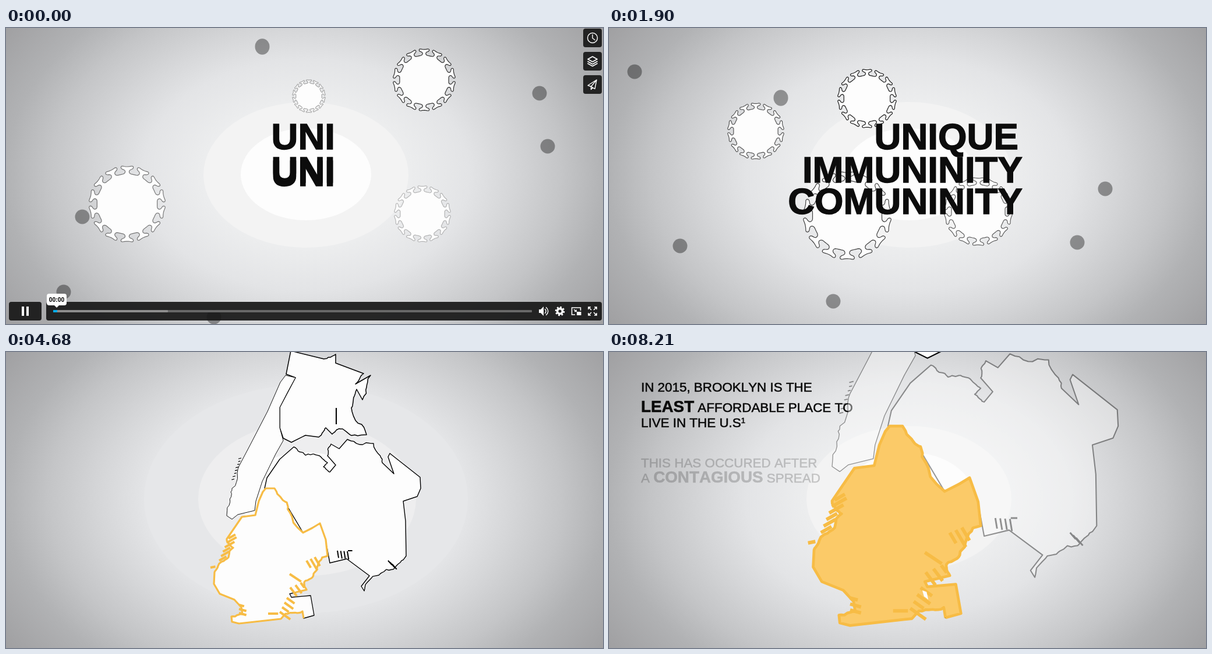
An HTML page that plays this animation: 1025x508 px, repeating every 8230 ms.

```html
<!DOCTYPE html>
<html lang="en">
<head>
<meta charset="utf-8">
<title>Unique immunity</title>
<style>
  html, body { margin: 0; width: 100%; height: 100%; overflow: hidden; background: #d4d5d6; }
  svg { display: block; width: 100%; height: 100%; font-family: "Liberation Sans", Arial, sans-serif; font-kerning: none; }
  .word { font-size: 63.6px; font-weight: bold; fill: #0c0c0c; stroke: #0c0c0c; stroke-width: 1.4; }
  .note { font-size: 22.4px; fill: #0a0a0a; stroke: #0a0a0a; stroke-width: .55; }
  .note .big { font-size: 27.8px; font-weight: bold; }
  .panel { fill: #171717; fill-opacity: .92; }
  .line { fill: none; stroke: #fff; stroke-width: 1.4; stroke-linejoin: round; stroke-linecap: round; }
</style>
</head>
<body>
<svg viewBox="0 0 1025 508">
  <defs>
    <radialGradient id="bg" gradientUnits="userSpaceOnUse" cx="0" cy="0" r="640"
      gradientTransform="translate(515 252) scale(1 .71)">
      <stop offset="0" stop-color="#f1f1f2"/>
      <stop offset=".28" stop-color="#ecedee"/>
      <stop offset=".4375" stop-color="#e3e4e6"/>
      <stop offset=".555" stop-color="#d5d6d8"/>
      <stop offset=".6875" stop-color="#c4c5c7"/>
      <stop offset=".805" stop-color="#b1b2b4"/>
      <stop offset=".977" stop-color="#a0a0a2"/>
    </radialGradient>
  </defs>
  <rect width="1025" height="508" fill="url(#bg)"/>
  <ellipse cx="515" cy="252" rx="176" ry="125" fill="#f3f3f3"/>
  <g id="rings">
    <ellipse cx="515" cy="252" rx="278" ry="196" fill="#e6e7e9"/>
    <ellipse cx="517" cy="252" rx="187" ry="132" fill="#eeeeef"/>
  </g>
  <ellipse cx="515" cy="251" rx="112" ry="79" fill="#fdfdfd"/>
  <g id="dots" fill-opacity=".37"></g>
  <g id="note1" class="note">
    <text x="55" y="68">IN 2015, BROOKLYN IS THE</text>
    <text x="55" y="103"><tspan class="big">LEAST</tspan> AFFORDABLE PLACE TO</text>
    <text x="55" y="128.5">LIVE IN THE U.S<tspan font-size="13" dy="-7">1</tspan></text>
  </g>
  <g id="note2" class="note">
    <text x="55" y="197.5">THIS HAS OCCURED AFTER</text>
    <text x="55" y="224">A <tspan class="big">CONTAGIOUS</tspan> SPREAD</text>
  </g>
  <g id="map" stroke-linejoin="round"></g>
  <g id="words" class="word"></g>
  <g id="player">
    <g class="panel">
      <rect x="991" y="1" width="32" height="32" rx="4"/>
      <rect x="991" y="41" width="32" height="32" rx="4"/>
      <rect x="991" y="81" width="32" height="32" rx="4"/>
      <rect x="5" y="470" width="56" height="32" rx="4"/>
      <rect x="69" y="470" width="954" height="32" rx="4"/>
    </g>
    <g class="line">
      <circle cx="1007" cy="17" r="8.5"/>
      <path d="M1007 11.5V17.5L1011 20.5"/>
      <path d="M1007 49l8 4.500-8 4.500-8-4.500zM999 57.500l8 4.500 8-4.500M999 61l8 4.500 8-4.500" stroke-width="1.700"/>
      <path d="M1014 89l-15 9.500 5.500 2 6.500 4zl-9.500 11.500v5l3-3.500"/>
    </g>
    <path d="M27 478h4v16h-4zM35 478h4v16h-4z" fill="#fff"/>
    <rect x="81" y="484" width="822" height="4" rx="1" fill="#686868"/>
    <rect x="81" y="484" width="197" height="4" rx="1" fill="#8e8e8e"/>
    <rect x="81" y="484" width="7" height="4" rx="1" fill="#00adef"/>
    <rect x="70" y="456" width="34" height="20" rx="4" fill="#fff"/>
    <path d="M83 476h8l-4 4z" fill="#fff"/>
    <text x="87" y="470" font-size="10.3" font-weight="bold" text-anchor="middle">00:00</text>
    <path d="M915 483h3l5-5v16l-5-5h-3z" fill="#fff"/>
    <path class="line" d="M925.5 482.5q3 3.500 0 7M927.500 479.500q6.500 6.500 0 13" stroke-width="1.800"/>
    <g fill="none" stroke="#fff" stroke-width="1.6">
      <circle cx="951" cy="486" r="4.4" stroke-width="3.6"/>
      <circle cx="951" cy="486" r="7" stroke-width="2.6" stroke-dasharray="2.75"/>
      <path d="M977 492h-5.500v-12h15v5M975 483l4 3.500m0-3v3h-3"/>
      <path id="corner" d="M1004 479h-4v4m0-4l5 5"/>
      <use href="#corner" transform="rotate(90 1007 486)"/>
      <use href="#corner" transform="rotate(180 1007 486)"/>
      <use href="#corner" transform="rotate(270 1007 486)"/>
    </g>
    <rect x="980" y="487" width="7.5" height="6" fill="#fff"/>
  </g>
</svg>
<script>
const LOOP = 8230, STEP = 146.4, SAMPLES = 420, SPIKES = 14;
const $ = id => document.getElementById(id);
const clamp = v => Math.max(0, Math.min(1, v));
const ramp = (k, a, b) => clamp((k - a) / (b - a));
const mix = (a, b, p) => a + (b - a) * p;
const mixPt = (a, b, p) => [mix(a[0], b[0], p), mix(a[1], b[1], p)];
const smooth = p => p * p * (3 - 2 * p);
const easeOut = p => 1 - (1 - p) ** 2;
const toPath = pts => 'M' + pts.map(p => p[0].toFixed(1) + ' ' + p[1].toFixed(1)).join('L') + 'Z';
const blend = (a, b, p) => a.map((q, i) => mixPt(q, b[i], p));

let seed = 7;
const jitter = () => (seed = (seed * 16807) % 2147483647) / 1073741823.5 - 1;

function add(parent, tag, attrs, text) {
  const el = document.createElementNS('http://www.w3.org/2000/svg', tag);
  for (const name in attrs) el.setAttribute(name, attrs[name]);
  if (text) el.textContent = text;
  return parent.appendChild(el);
}

// Points from a to b (b left out), with fractal bends
function rough(a, b, depth = 3) {
  const len = Math.hypot(b[0] - a[0], b[1] - a[1]);
  if (!depth || len < 3) return [a];
  const m = mixPt(a, b, .5).map(v => v + jitter() * len * .15);
  return [...rough(a, m, depth - 1), ...rough(m, b, depth - 1)];
}

// Key points; a "~" marks the side leading to a point as ragged coast
function coast(text) {
  const keys = text.trim().split(/\s+/).map(s => ({ wild: s[0] === '~', p: s.replace('~', '').split(',').map(Number) }));
  return keys.flatMap(({ p }, i) => {
    const next = keys[(i + 1) % keys.length];
    return rough(p, next.p, next.wild ? 3 : 0);
  });
}

// A row of short strokes for inlets and piers
function comb([x0, y0], [x1, y1], n, [dx, dy]) {
  let d = '';
  for (let i = 0; i < n; i++) {
    const p = n > 1 ? i / (n - 1) : 0, s = 1 + jitter() * .3;
    d += `M${mix(x0, x1, p)} ${mix(y0, y1, p)}l${dx * s} ${dy * s}`;
  }
  return d;
}

// Evenly spaced points along a closed outline
function resample(pts) {
  const ring = [...pts, pts[0]], len = [0];
  for (let i = 1; i < ring.length; i++)
    len.push(len[i - 1] + Math.hypot(ring[i][0] - ring[i - 1][0], ring[i][1] - ring[i - 1][1]));
  const total = len[len.length - 1], out = [];
  for (let i = 0, j = 0; i < SAMPLES; i++) {
    const d = total * i / SAMPLES;
    while (len[j + 1] <= d) j++;
    out.push(mixPt(ring[j], ring[j + 1], (d - len[j]) / (len[j + 1] - len[j])));
  }
  return out;
}

const roundOff = pts => pts.flatMap((p, i) => [.25, .75].map(t => mixPt(p, pts[(i + 1) % pts.length], t)));

// Unit disc with T-shaped spikes: tangent offset, distance from centre
const half = [[-.15, .78], [-.06, .8], [-.045, .89], [-.17, .93], [-.16, 1.01], [-.05, .985]];
const spike = [...half, ...half.map(([u, v]) => [-u, v]).reverse()];
function virus(first) {
  const pts = [];
  for (let i = 0; i < SPIKES; i++) {
    const a = (i + first) * 2 * Math.PI / SPIKES, c = Math.cos(a), s = Math.sin(a);
    for (const [u, v] of spike) pts.push([u * c + v * s, u * s - v * c]);
  }
  return resample(roundOff(roundOff(pts)));
}

// Squeeze an outline into a box and pull it towards an ellipse
function squeeze(pts, [cx, cy, rx, ry], round) {
  const unit = i => {
    const all = pts.map(p => p[i]), lo = Math.min(...all), hi = Math.max(...all);
    return v => (v - lo) / (hi - lo) * 2 - 1;
  };
  const ux = unit(0), uy = unit(1);
  return pts.map(p => {
    const u = ux(p[0]), v = uy(p[1]), s = mix(1, 1 / Math.max(.2, Math.hypot(u, v)), round);
    return [cx + rx * u * s, cy + ry * v * s];
  });
}

// Quadratic through three values at steps 0, 7 and 13
function through(a, b, c, k) {
  const s1 = (b - a) / 7, s2 = (c - b) / 6;
  return a + s1 * k + (s2 - s1) / 13 * k * (k - 7);
}

const regions = [
  { // north
    at: [[718, 89, 53], [554, 89, 50], [443, 121, 50]], first: 0, ink: .8, width: 1.5,
    box: [506, 90, 59, 62], round: 0,
    outline: `489,-2 546,12 ~566,4 566,19 614,37 ~600,55 626,40 ~612,82 602,64 ~593,96 ~619,142 ~578,132
      ~560,141 549,130 ~537,146 514,143 490,155 476,148 470,130 470,95 497,44 481,38`,
    marks: comb([567, 96], [567, 96], 1, [0, 40])
  },
  { // west
    at: [[520, 117, 28], [357, 150, 33], [252, 177, 48]], first: 0, ink: .32, width: .9,
    box: [306, 182, 46, 89], round: .3,
    outline: `480,40 497,44 484,68 470,95 470,130 476,152 463,175 440,222 429,256 427,272 398,279 388,287 379,281
      ~386,240 ~400,196 420,158 449,102 471,52`,
    marks: comb([404, 182], [392, 218], 8, [-4, 1])
  },
  { // east
    at: [[715, 319, 48], [677, 321, 54], [634, 315, 58]], first: 0, ink: .26, width: 1.4,
    box: [564, 249, 49, 73], round: .5,
    outline: `586,150 ~631,157 ~646,190 666,209 656,180 659,174 711,215 712,234 706,248 682,256 686,290 687,350
      ~667,371 ~640,383 ~615,410 610,402 624,384 585,355 556,362 551,335 539,294 510,310 485,268 444,234 448,216
      470,184 494,163 ~514,177 ~538,178 ~552,190 ~545,197 ~556,206 566,194 552,178 ~558,158 572,166`,
    marks: comb([569, 341], [586, 342], 4, [2, 12]) + comb([587, 341], [587, 341], 1, [9, 0]) + comb([656, 358], [663, 364], 3, [7, 8])
  },
  { // south
    at: [[208, 302, 65], [307, 310, 72], [409, 322, 75]], first: 5, ink: .5, width: 1.3,
    box: [391, 357, 54, 49], round: .25,
    outline: `511,457 509,445 ~480,449 472,458 400,466 388,463 387,454 ~406,450 404,438 392,425 367,415 357,398
      358,378 ~370,360 ~390,336 ~379,321 405,283 428,280 434,256 441,240 446,234 461,234 ~482,258 ~510,310 526,302
      539,294 549,322 552,350 ~530,378 ~512,395 ~516,408 487,415 490,421 523,418 529,452`,
    marks: ''
  }
];

const map = $('map');
for (const r of regions) {
  r.raw = coast(r.outline);
  r.end = resample(r.raw);
  r.mid = squeeze(r.end, r.box, r.round);
  r.start = virus(r.first);
  r.g = add(map, 'g', { stroke: '#000', fill: '#fdfdfd' });
  r.shape = add(r.g, 'path', {});
  r.inlets = add(r.g, 'path', { d: r.marks, fill: 'none', 'stroke-width': r.width * 1.4 });
}
const gold = add(map, 'path', {
  d: toPath(regions[3].raw), pathLength: 1, 'stroke-dasharray': '1 1',
  fill: '#fbca68', stroke: '#f7bc45', 'stroke-width': 3.2
});
const inlets = add(map, 'path', {
  d: comb([516, 358], [530, 352], 3, [10, 17]) + comb([487, 381], [487, 381], 1, [21, 14]) +
     comb([488, 404], [506, 396], 3, [9, 12]) + comb([470, 446], [482, 422], 4, [14, 10]) +
     comb([450, 449], [450, 449], 1, [24, 0]) + comb([400, 434], [400, 448], 3, [11, 3]) +
     comb([382, 320], [366, 358], 6, [14, -8]) + comb([351, 370], [351, 370], 1, [10, -2]),
  fill: 'none', stroke: '#f7bc45', 'stroke-width': 4
});
const notch = add(map, 'path', { d: 'M484 425l5 2 2 9-5-4z', fill: '#fdfdfd' });

const dots = [
  [[440, 32], [486, 67], [295, 120]],
  [[131, 324], [115, 184], [44, 75]],
  [[99, 453], [232, 361], [122, 374]],
  [[357, 496], [360, 383], [385, 469]],
  [[916, 112], [752, 182], [804, 368]],
  [[930, 203], [788, 280], [852, 276]]
].map((at, i) => ({ at, el: add($('dots'), 'ellipse', { rx: 12.5, ry: i ? 12.5 : 13.7 }) }));

const LEFT = 455.5, RIGHT = 565;
const words = [['', 'QUE', 207.5, 4], ['IMM', 'NITY', 264.5, 8], ['COM', 'NITY', 318.5, 10]].map(([pre, post, y, from]) => ({
  from,
  stem: add($('words'), 'text', { x: LEFT, y }, 'UNI'),
  ends: [add($('words'), 'text', { x: LEFT, y, 'text-anchor': 'end' }, pre),
         add($('words'), 'text', { x: RIGHT, y }, post)]
}));

const set = (el, name, v) => el.setAttribute(name, v);
const fade = (el, v) => set(el, 'opacity', v);

function draw(k) {
  const zoom = ramp(k, 52, 56);
  fade($('player'), 1 - ramp(k, 0, 2));
  fade($('rings'), ramp(k, 20, 26) * (1 - zoom));

  fade($('dots'), 1 - ramp(k, 14, 16));
  for (const { at: [a, b, c], el } of dots) {
    set(el, 'cx', through(a[0], b[0], c[0], k));
    set(el, 'cy', through(a[1], b[1], c[1], k));
  }

  fade($('words'), 1 - ramp(k, 15, 18));
  for (const w of words) w.ends.forEach(el => fade(el, ramp(k, w.from, w.from + 2)));
  set(words[2].stem, 'y', mix(270.5, 318.5, easeOut(ramp(k, 0, 5))));

  set(map, 'transform', `translate(${-176 * zoom} ${-218 * zoom}) scale(${1 + .475 * zoom})`);

  const melt = smooth(ramp(k, 14, 20)), settle = easeOut(ramp(k, 20, 27));
  for (const r of regions) {
    let pts = r.raw;
    if (k < 27) {
      const [x, y, rad] = [0, 1, 2].map(i => through(r.at[0][i], r.at[1][i], r.at[2][i], Math.min(k, 15)));
      pts = k < 20
        ? blend(r.start.map(p => [x + p[0] * rad, y + p[1] * rad]), r.mid, melt)
        : blend(r.mid, r.end, settle);
    }
    set(r.shape, 'd', toPath(pts));
    set(r.shape, 'stroke-width', mix(1.2, r.width, settle));
    set(r.g, 'stroke-opacity', mix(r.ink, 1, ramp(k, 0, 27)));
    fade(r.inlets, ramp(k, 23, 27));
  }
  for (const r of regions.slice(1, 3)) fade(r.g, 1 - .6 * zoom);

  const trace = clamp((k - 28) * .22), fill = ramp(k, 33, 36);
  fade(gold, trace > 0 ? 1 : 0);
  set(gold, 'stroke-dashoffset', 1 - trace);
  set(gold, 'fill-opacity', fill);
  fade(inlets, ramp(k, 29, 32));
  fade(notch, fill);

  fade($('note1'), ramp(k, 39, 43));
  fade($('note2'), .2 * ramp(k, 53, 56));
}

const begin = performance.now();
let last = -1;
function tick() {
  const t = (performance.now() - begin) % LOOP;
  const k = Math.min(56, Math.floor((t + 6) / STEP));
  if (k !== last) draw(last = k);
  requestAnimationFrame(tick);
}
tick();
</script>
</body>
</html>
```
